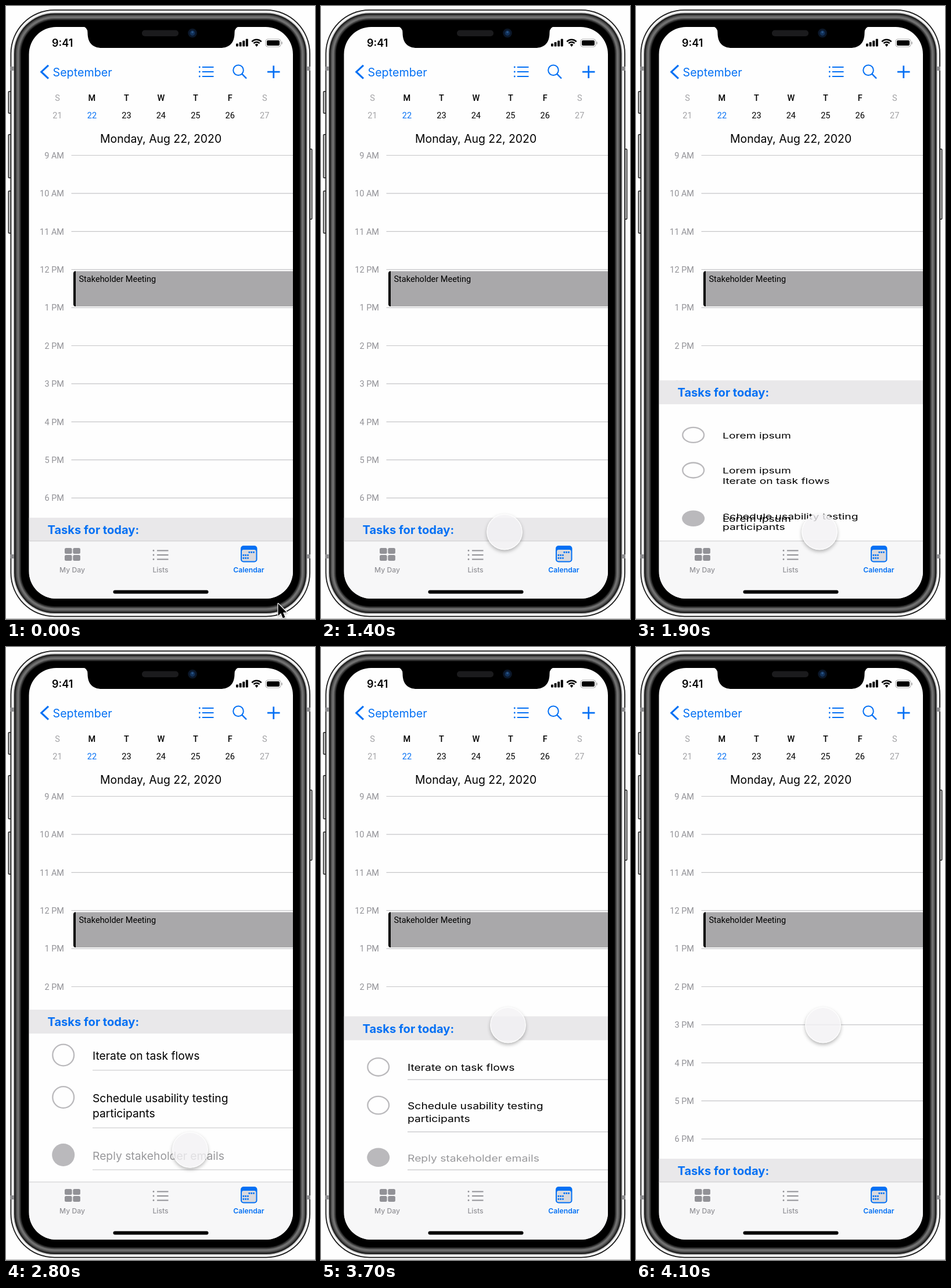
Write an HTML page with a canvas that moves like this. It is 532 px wide and 1053 px high and loops after 4.9 s.

```html
<!DOCTYPE html>
<html lang="en">
<head>
<meta charset="utf-8">
<title>Calendar with task drawer</title>
<style>
  html, body { margin: 0; width: 100%; height: 100%; overflow: hidden; background: #fefefe; }
  canvas { display: block; width: 532px; height: 1053px; }
</style>
</head>
<body>
<canvas id="stage"></canvas>
<script>
const W = 532, H = 1053, LOOP = 4900, STEP = 100;
const canvas = document.getElementById('stage');
const ctx = canvas.getContext('2d');
const dpr = window.devicePixelRatio || 1;
canvas.width = W * dpr;
canvas.height = H * dpr;

const BLUE = '#0370f4', GREY = '#929297', RULE = '#c5c5c8';
const INTER = 'Inter, sans-serif', ROBOTO = 'Roboto, sans-serif';
const SCREEN = { l: 39.5, t: 36, r: 494, b: 1018 };
const TAB_TOP = 919, BAND_H = 41;

// ---- timing ----
function bezier(x1, y1, x2, y2) {
  const at = (a, b, u) => 3 * a * u * (1 - u) ** 2 + 3 * b * u * u * (1 - u) + u ** 3;
  return x => {
    if (x <= 0) return 0;
    if (x >= 1) return 1;
    let lo = 0, hi = 1;
    for (let i = 0; i < 24; i++) {
      const mid = (lo + hi) / 2;
      if (at(x1, x2, mid) < x) lo = mid; else hi = mid;
    }
    return at(y1, y2, lo);
  };
}
const easeInOut = bezier(0.42, 0, 0.58, 1);
const ease = bezier(0.25, 0.1, 0.25, 1);
const span = (t, start, dur, curve) => curve((t - start) / dur);
const mix = (a, b, p) => a + (b - a) * p;

// ---- drawing helpers ----
function box(l, t, r, b, rad, fill) {
  ctx.beginPath();
  ctx.roundRect(l, t, r - l, b - t, rad);
  ctx.fillStyle = fill;
  ctx.fill();
}
function line(points, color, width) {
  ctx.beginPath();
  points.forEach(([x, y]) => ctx.lineTo(x, y));
  ctx.strokeStyle = color;
  ctx.lineWidth = width;
  ctx.stroke();
}
function disc(x, y, r, fill) {
  ctx.beginPath();
  ctx.arc(x, y, r, 0, Math.PI * 2);
  ctx.fillStyle = fill;
  ctx.fill();
}
// y is the middle of the capitals; squash flattens the glyphs vertically
function text(str, x, y, size, o = {}) {
  ctx.save();
  ctx.translate(x, y);
  ctx.scale(1, o.squash ?? 1);
  ctx.font = `${o.weight || 400} ${size}px ${o.font || INTER}`;
  ctx.textAlign = o.align || 'left';
  ctx.fillStyle = o.color || '#000';
  ctx.fillText(str, 0, size * 0.36);
  ctx.restore();
}
function bullets(x, ys, gap, end, color) {
  for (const y of ys) {
    disc(x, y, 1.4, color);
    line([[x + gap, y], [end, y]], color, 2);
  }
}

// ---- phone ----
function drawBody() {
  ctx.fillStyle = '#fefefe';
  ctx.fillRect(0, 0, W, H);
  ctx.fillStyle = '#b5b5b5';
  ctx.fillRect(0, 1052, W, 1);

  for (const [l, t, r, b] of [[3.5, 146, 11, 185], [3.5, 220, 11, 296], [3.5, 317, 11, 391], [519, 245, 527.5, 367]]) {
    box(l, t, r, b, 2, '#222');
    box(l + 1.4, t + 1.5, r - 1.4, b - 1.5, 1, '#c4c4c4');
  }
  const shells = [[0, '#1a1a1a'], [1.8, '#f4f4f4'], [5.2, '#c0c0c0'], [6.5, '#202020'], [9, '#484848'],
    [11, '#6a6a6a'], [13, '#727272'], [15, '#464646'], [17, '#1c1c1c'], [18.5, '#000']];
  for (const [d, color] of shells) box(7.5 + d, 6 + d, 524 - d, 1049.5 - d, 76 - d, color);
  for (const y of [104, 942]) {
    box(7.5, y, 14, y + 7, 0, '#8d8d8f');
    box(517.5, y, 524, y + 7, 0, '#8d8d8f');
  }
}

function drawNotch() {
  const t = SCREEN.t - 1;
  ctx.beginPath();
  ctx.moveTo(131, t);
  ctx.quadraticCurveTo(140.5, t + 1, 140.5, t + 11);
  ctx.bezierCurveTo(140.5, 64, 150, 72, 165, 72);
  ctx.lineTo(369, 72);
  ctx.bezierCurveTo(384, 72, 393.5, 64, 393.5, t + 11);
  ctx.quadraticCurveTo(393.5, t + 1, 403, t);
  ctx.closePath();
  ctx.fillStyle = '#000';
  ctx.fill();
  box(234, 41.5, 297, 52, 5, '#1b1b1d');
  disc(321, 46.5, 7.8, '#0b1729');
  disc(321, 46.5, 4.4, '#123159');
  disc(321, 45, 1.8, '#2b5688');
}

function drawStatus() {
  text('9:41', 79, 63.5, 18, { weight: 600 });
  [5, 7.5, 10, 13].forEach((h, i) => box(396 + i * 5.6, 69.5 - h, 400 + i * 5.6, 69.5, 1, '#000'));
  for (const r of [11.2, 7]) {
    ctx.beginPath();
    ctx.arc(431.5, 69, r, -Math.PI * 0.76, -Math.PI * 0.24);
    ctx.strokeStyle = '#000';
    ctx.lineWidth = 2.6;
    ctx.stroke();
  }
  ctx.beginPath();
  ctx.moveTo(431.5, 70);
  ctx.arc(431.5, 69, 3.8, -Math.PI * 0.76, -Math.PI * 0.24);
  ctx.fillStyle = '#000';
  ctx.fill();
  ctx.beginPath();
  ctx.roundRect(447, 57, 26, 13, 4);
  ctx.strokeStyle = '#a5a5a5';
  ctx.lineWidth = 1.1;
  ctx.stroke();
  box(449, 59, 471, 68, 2, '#000');
  box(474.3, 61.3, 475.8, 65.7, 1, '#a5a5a5');
}

function drawHeader() {
  line([[73, 101.8], [60.8, 113.2], [73, 124.6]], BLUE, 3.1);
  text('September', 80.5, 113.5, 19.7, { color: BLUE });
  bullets(333.3, [105, 113, 121], 4.5, 357.5, BLUE);
  ctx.beginPath();
  ctx.arc(400, 110.3, 8.8, 0, Math.PI * 2);
  ctx.strokeStyle = BLUE;
  ctx.lineWidth = 2;
  ctx.stroke();
  line([[406.2, 116.6], [414, 124.5]], BLUE, 2.4);
  line([[450, 113.2], [471.5, 113.2]], BLUE, 2.8);
  line([[460.7, 102.5], [460.7, 124]], BLUE, 2.8);

  [...'SMTWTFS'].forEach((day, i) => {
    const x = 88.5 + i * 59.45, off = i % 6 === 0;
    const o = { font: ROBOTO, align: 'center', color: off ? '#a2a2a5' : '#000' };
    text(day, x, 158, 14.5, { ...o, weight: off ? 400 : 500 });
    text(21 + i, x, 188, 14.5, i === 1 ? { ...o, color: BLUE } : o);
  });
  text('Monday, Aug 22, 2020', 162, 228.5, 19.4);
}

function drawHours() {
  for (let i = 0; i <= 10; i++) {
    const y = 256.5 + i * 65.4, h = 9 + i;
    text(`${h > 12 ? h - 12 : h} ${h < 12 ? 'AM' : 'PM'}`, 100, y, 14.5, { font: ROBOTO, align: 'right', color: GREY });
    line([[112.5, y], [SCREEN.r, y]], RULE, 1.2);
  }
  box(116, 455.5, 496, 516, 4, '#a9a8aa');
  box(116, 455.5, 120, 516, [4, 0, 0, 4], '#000');
  text('Stakeholder Meeting', 125.5, 468.7, 14.5, { font: ROBOTO });
}

// ---- task drawer ----
const tasks = [
  { y: 701, rule: 727, lines: ['Iterate on task flows'] },
  { y: 773.5, rule: 826, lines: ['Schedule usability testing', 'participants'] },
  { y: 872.5, rule: 898, lines: ['Reply stakeholder emails'], done: true }
];

function drawDrawer(t) {
  const closing = t >= 3600;
  const shown = closing ? 1 - span(t, 3637, 423, easeInOut) : span(t, 1560, 423, easeInOut);
  const top = mix(879, 623, shown);
  const fold = 2.1 * (1 - shown);
  const squash = 1 - 1.78 * fold;
  if (squash > 0) drawTasks(top + BAND_H, fold, squash, closing);
  ctx.fillStyle = '#e9e8ea';
  ctx.fillRect(SCREEN.l, top, SCREEN.r - SCREEN.l, BAND_H);
  text('Tasks for today:', 71.5, top + 21, 20.1, { weight: 700, color: BLUE });
}

function drawTasks(top, fold, squash, closing) {
  const place = (y, pivot = TAB_TOP) => pivot - (pivot - y) * (1 - fold);
  const swapping = !closing && fold > 0.04;
  const drop = closing ? 0 : 475 * fold;
  ctx.fillStyle = '#fefefe';
  ctx.fillRect(SCREEN.l, top, SCREEN.r - SCREEN.l, TAB_TOP - top);
  for (const { y, rule, lines, done } of tasks) {
    const r = done ? 19.5 : 18.4;
    ctx.beginPath();
    ctx.ellipse(98.7, place(y), r, r * squash, 0, 0, Math.PI * 2);
    ctx.fillStyle = ctx.strokeStyle = '#bab9bc';
    ctx.lineWidth = 2.3;
    if (done) ctx.fill(); else ctx.stroke();

    const base = place(y + 1.3);
    if (swapping) text('Lorem ipsum', 149, base, 19.3, { squash });
    lines.forEach((str, i) =>
      text(str, 149, base + drop + i * 26.3 * squash, 19.3, { squash, color: done ? '#98989b' : '#000' }));
    if (!swapping) {
      const ry = place(rule, 899);
      line([[149, ry], [SCREEN.r, ry]], RULE, 1.2);
    }
  }
}

function drawTabs() {
  ctx.fillStyle = '#f7f7f8';
  ctx.fillRect(SCREEN.l, TAB_TOP, SCREEN.r - SCREEN.l, SCREEN.b - TAB_TOP);
  line([[SCREEN.l, TAB_TOP], [SCREEN.r, TAB_TOP]], '#c9c9cb', 1.2);

  for (const x of [101, 115.3])
    for (const y of [931, 943]) box(x, y, x + 12.6, y + 10, 2.5, GREY);
  bullets(254, [935.5, 943, 950.5], 6, 279.5, GREY);

  box(404, 927, 432.5, 955.5, 5, BLUE);
  box(406, 934, 430.5, 953.5, 3, '#d9d9dd');
  const dots = (x, y, n) => {
    for (let i = 0; i < n; i++) box(x + i * 3.8, y, x + 2.7 + i * 3.8, y + 2.7, 0.6, BLUE);
  };
  dots(417.5, 937, 3);
  dots(407.5, 942, 3);
  dots(407.5, 947, 3);

  const label = { align: 'center', weight: 500, color: GREY };
  text('My Day', 114, 969, 12.2, label);
  text('Lists', 266, 969, 12.2, label);
  text('Calendar', 418, 969, 12.2, { ...label, weight: 600, color: BLUE });
  box(184.5, 1003.5, 348.5, 1009.5, 3, '#000');
}

// ---- pointer ----
function drawArrow(x, y) {
  const shape = [[0, 0], [0, 21], [4.7, 16.6], [8.2, 25], [12, 23.4], [8.5, 15.2], [14.8, 15.2]];
  ctx.save();
  ctx.translate(x, y);
  ctx.beginPath();
  shape.forEach(([px, py]) => ctx.lineTo(px, py));
  ctx.closePath();
  ctx.shadowColor = 'rgba(0,0,0,.35)';
  ctx.shadowBlur = 3 * dpr;
  ctx.shadowOffsetY = dpr;
  ctx.lineWidth = 2.4;
  ctx.lineJoin = 'round';
  ctx.strokeStyle = '#fff';
  ctx.stroke();
  ctx.shadowColor = 'transparent';
  ctx.fillStyle = '#000';
  ctx.fill();
  ctx.restore();
}

function drawTouch(x, y) {
  // shadow only outside the translucent disc
  ctx.save();
  ctx.beginPath();
  ctx.rect(0, 0, W, H);
  ctx.arc(x, y, 30.5, 0, Math.PI * 2);
  ctx.clip('evenodd');
  ctx.shadowColor = 'rgba(0,0,0,.3)';
  ctx.shadowBlur = 6 * dpr;
  ctx.shadowOffsetY = 3 * dpr;
  disc(x, y, 30.5, '#fff');
  ctx.restore();
  disc(x, y, 30.5, 'rgba(243,242,244,.8)');
  ctx.beginPath();
  ctx.arc(x, y, 30.2, 0, Math.PI * 2);
  ctx.strokeStyle = 'rgba(255,255,255,.8)';
  ctx.lineWidth = 1.4;
  ctx.stroke();
}

function drawPointer(t) {
  if (t < 1400) {
    const p = span(t, 0, 1000, ease);
    drawArrow(mix(468.5, 310.5, p), mix(1026.5, 893.5, p));
  } else {
    const p = span(t, 2700, 740, ease);
    drawTouch(mix(316, 322, p), mix(903.5, 649.5, p));
  }
}

function draw(t) {
  ctx.setTransform(dpr, 0, 0, dpr, 0, 0);
  drawBody();
  ctx.save();
  ctx.beginPath();
  ctx.roundRect(SCREEN.l, SCREEN.t, SCREEN.r - SCREEN.l, SCREEN.b - SCREEN.t, 47);
  ctx.clip();
  ctx.fillStyle = '#fefefe';
  ctx.fillRect(0, 0, W, H);
  drawStatus();
  drawHeader();
  drawHours();
  drawDrawer(t);
  drawTabs();
  ctx.restore();
  drawNotch();
  drawPointer(t);
}

const began = performance.now();
function tick() {
  const t = (performance.now() - began) % LOOP;
  draw(Math.floor(t / STEP) * STEP);
  requestAnimationFrame(tick);
}
tick();
</script>
</body>
</html>
```
